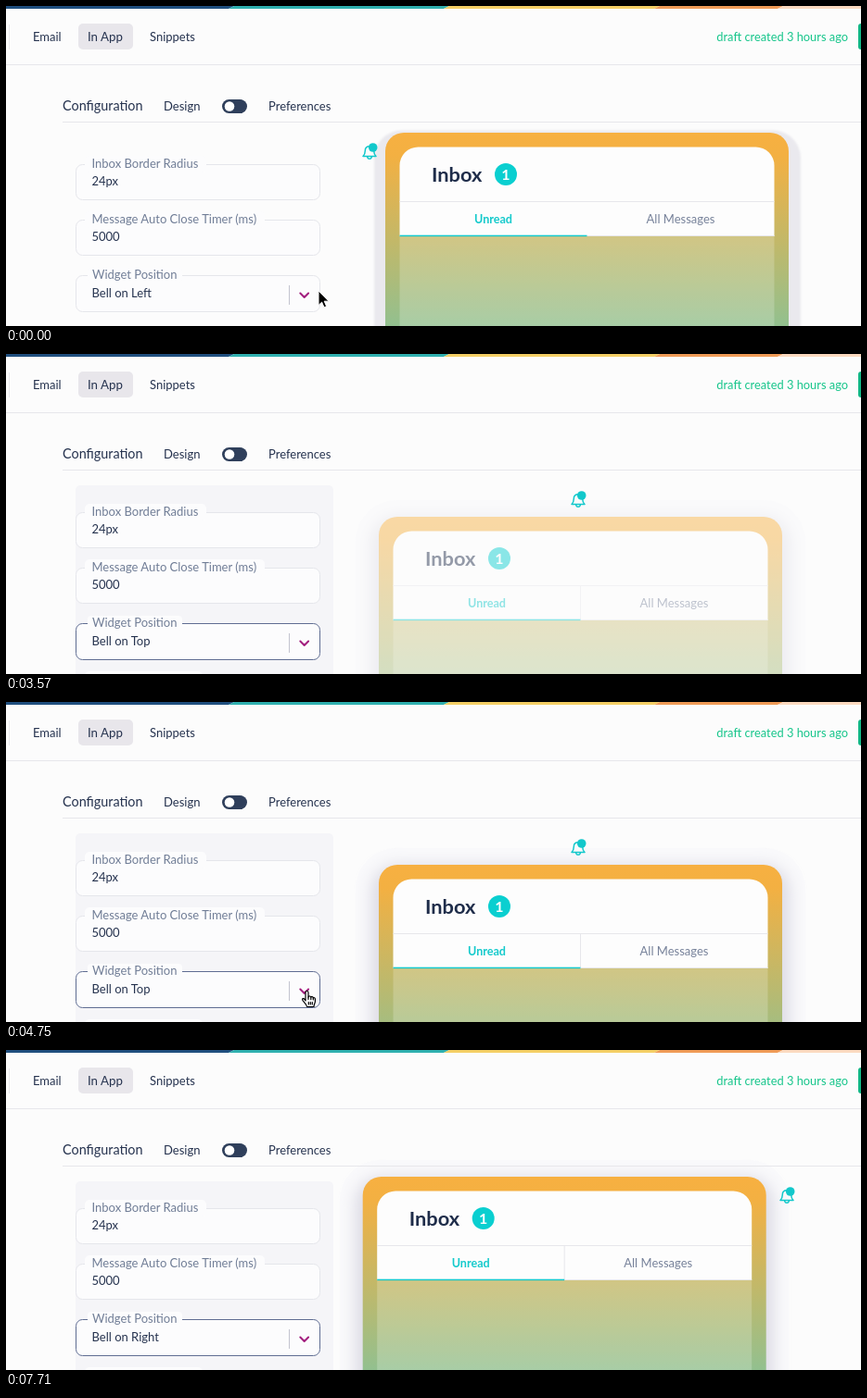
An HTML page that plays this animation: 922 px wide and 346 px high, repeating every 8 s.

```html
<!DOCTYPE html>
<html lang="en">
<head>
<meta charset="utf-8">
<title>Inbox widget configuration</title>
<style>
  html, body { margin: 0; width: 100%; height: 100%; overflow: hidden; background: #fcfcfc; }
  svg { display: block; }
  text { font: 13px Lato, "Open Sans", sans-serif; fill: #26334f; }
  .label { fill: #707d96; }
  .field { fill: #fcfcfd; stroke: #e5e6eb; }
  .patch { fill: #fcfcfd; }
  .mid { text-anchor: middle; }
  .line { stroke: #e7e7eb; }
</style>
</head>
<body>
<svg width="922" height="346" viewBox="0 0 922 346">
  <defs>
    <linearGradient id="frameFill" gradientUnits="userSpaceOnUse" x1="0" y1="0" x2="0" y2="209">
      <stop offset="0" stop-color="#f7b041"/>
      <stop offset=".12" stop-color="#f3b042"/>
      <stop offset="1" stop-color="#92c08f"/>
    </linearGradient>
    <filter id="soft" x="-20%" y="-20%" width="140%" height="140%">
      <feGaussianBlur stdDeviation="8"/>
    </filter>
    <filter id="edge"><feGaussianBlur stdDeviation=".8"/></filter>
  </defs>

  <rect width="922" height="346" fill="#fcfcfc"/>
  <rect id="panel" x="75" width="278" fill="#f5f5f8"/>

  <!-- inbox preview, origin at the frame's top left corner -->
  <g id="widget">
    <g id="band">
      <rect x="-12" y="-2.5" width="460" height="300" rx="30" fill="#eae9ee" filter="url(#edge)"/>
    </g>
    <g id="glow">
      <rect x="-25" y="-18" width="485" height="320" rx="44" fill="#f9f9fb"/>
      <rect x="-8" y="0" width="451" height="300" rx="28" fill="#dddce5" filter="url(#soft)"/>
    </g>
    <rect width="435" height="300" rx="20" fill="url(#frameFill)"/>
    <path d="M15.5 112V35.5a20 20 0 0 1 20-20H399.5a20 20 0 0 1 20 20V112Z" fill="#fdfdfd"/>
    <rect x="15.5" y="112" width="404" height="190" fill="#fff" fill-opacity=".2"/>
    <path class="line" d="M15.5 74.5H419.5M217.5 111.5H419.5"/>
    <path id="divider" class="line" d="M217.5 75V111"/>
    <rect x="15.5" y="110.7" width="202" height="1.5" fill="#13c9cd"/>
    <text x="50" y="53" style="font-size:21.8px;font-weight:700;fill:#1f2d4a">Inbox</text>
    <circle cx="130" cy="45" r="12" fill="#0acfd0"/>
    <text class="mid" x="130" y="51" style="font-size:16px;font-weight:700;fill:#fff">1</text>
    <text class="mid" x="116.5" y="97.5" style="font-size:12.6px;font-weight:700;fill:#14cacc">Unread</text>
    <text class="mid" x="318.5" y="97.5" style="fill:#77829a">All Messages</text>
  </g>

  <g id="bell" fill="none" stroke="#12c8cb" stroke-width="1.5" stroke-linecap="round" stroke-linejoin="round">
    <path d="M-7 4.5C-5 2.5-4.7 1-4.7-1.5C-4.7-4.5-2.7-6.3 0-6.3S4.7-4.5 4.7-1.5C4.7 1 5 2.5 7 4.5ZM-2.3 5.5A2.4 2.4 0 0 0 2.3 5.5"/>
    <circle cx="3.7" cy="-5" r="4.8" fill="#12c8cb" stroke="none"/>
  </g>

  <!-- page header -->
  <path fill="#204f7f" d="M0 0H246L240 3H0Z"/>
  <path fill="#2fb0af" d="M246 0H478L472 3H240Z"/>
  <path fill="#f4cf65" d="M478 0H705L699 3H472Z"/>
  <path fill="#f09b57" d="M705 0H838L832 3H699Z"/>
  <path fill="#fbdac0" d="M838 0H922V3H832Z"/>
  <path class="line" d="M0 63.5H922M61 125.5H922M3.5 20V47"/>
  <rect x="78" y="19" width="59" height="28" rx="5" fill="#e8e6eb"/>
  <text x="29" y="38">Email</text>
  <text x="88" y="38" style="font-size:13.3px">In App</text>
  <text x="155" y="38">Snippets</text>
  <text x="908" y="38" text-anchor="end" style="font-size:12.85px;fill:#15c58a">draft created 3 hours ago</text>
  <rect x="919" y="19" width="12" height="28" rx="3" fill="#12b886"/>
  <text x="61" y="113" style="font-size:14.4px">Configuration</text>
  <text x="170" y="113">Design</text>
  <rect x="233" y="101" width="27" height="15" rx="7.5" fill="#2f3f5b"/>
  <circle cx="241" cy="108.5" r="5.3" fill="#fff"/>
  <text x="283" y="113">Preferences</text>

  <!-- form -->
  <rect class="field" x="75.5" y="171.5" width="263" height="38" rx="7"/>
  <rect class="patch" x="85" y="162" width="131" height="18" rx="5"/>
  <text class="label" x="92.5" y="175">Inbox Border Radius</text>
  <text x="92.5" y="194">24px</text>
  <rect class="field" x="75.5" y="231.5" width="263" height="38" rx="7"/>
  <rect class="patch" x="85" y="222" width="194" height="18" rx="5"/>
  <text class="label" x="92.5" y="235">Message Auto Close Timer (ms)</text>
  <text x="92.5" y="254">5000</text>
  <rect id="nextLabel" class="patch" x="85" y="343" width="127" height="18" rx="5"/>
  <rect id="menu" x="75.5" y="326.5" width="263" height="40" fill="#fdfdfe" stroke="#e3e4ea"/>
  <rect id="select" class="field" x="75.5" y="291.5" width="263" height="39" rx="7"/>
  <rect class="patch" x="88" y="283" width="102" height="16" rx="4"/>
  <text class="label" x="93" y="295">Widget Position</text>
  <text id="value" x="92.5" y="315"></text>
  <path id="caret" d="M158.5 304V318" stroke="#1d2433"/>
  <path d="M305.5 302V323" stroke="#c3c5d0"/>
  <path d="M317.3 310.5L321.7 315L326.1 310.5" fill="none" stroke="#a3207f" stroke-width="2" stroke-linecap="round" stroke-linejoin="round"/>

  <!-- pointers -->
  <path id="arrow" d="M0 0V15.5L3.6 12.2L6 17.8L8.6 16.7L6.2 11.2H11Z" fill="#000" stroke="#fff" stroke-width="1"/>
  <g id="hand" stroke="#000" stroke-width="1.2" stroke-linejoin="round" stroke-linecap="round">
    <path fill="#fff" d="M4 11V2.2C4-.1 7-.1 7 2.2V7C7.3 5.6 9.6 5.7 9.8 7.3C10.2 6.2 12.2 6.5 12.3 8C12.8 7.3 14.4 7.6 14.4 9.2V11.5C14.4 14 13 14.7 13 17.5H5.6C5.3 15 2 12.6.8 10.2C.1 8.6 2 8 2.9 9.3Z"/>
    <path fill="none" d="M7 7V9.5M9.8 7.5V9.7M12.3 8.3V10M7.3 12.5V15M9.3 12.5V15M11.3 12.5V15"/>
  </g>
</svg>
<script>
  const LOOP = 8000;
  const el = Object.fromEntries([...document.querySelectorAll("[id]")].map(n => [n.id, n]));

  const layouts = [
    { from: 0, value: "Bell on Left", x: 409, y: 137, bell: 392 },
    { from: 3570, value: "Bell on Top", x: 402, y: 176, bell: 617 },
    { from: 7120, value: "Bell on Right", x: 384.7, y: 137, bell: 842 }
  ];

  // [start, shape, x, y]; the pointer holds each place until the next
  const pointer = [
    [0, "arrow", 337, 308], [140, "hand", 331, 311], [740, "hand", 328, 311],
    [890, "hand", 325, 311], [1180, "hand", 315, 311], [2230, "hand", 315, 324],
    [2670, ""], [3720, "arrow", 317, 335], [4460, "arrow", 318, 326],
    [4600, "hand", 319, 318], [4750, "hand", 319, 312], [6080, "hand", 319, 317],
    [6230, ""]
  ];

  const caretOn = [[1180, 1630], [2080, 2670], [3120, 3570], [5640, 6080], [6530, 7120]];
  const menuOpen = [[2230, 3570], [5640, 7120]];

  const within = (spans, t) => spans.some(([a, b]) => t >= a && t < b);
  const show = (node, on) => node.setAttribute("visibility", on ? "visible" : "hidden");
  const move = (node, x, y) => node.setAttribute("transform", `translate(${x} ${y})`);

  // stepped ease-out, one step about every 148 ms
  function fade(age) {
    const p = Math.min(1, 0.27 + 0.25 * Math.floor(age / 147));
    return 1 - (1 - p) ** 2;
  }

  function draw(t) {
    const layout = layouts.findLast(l => t >= l.from);
    const first = layout === layouts[0];
    const open = within(menuOpen, t);

    move(el.widget, layout.x, layout.y);
    el.widget.setAttribute("opacity", first ? 1 : fade(t - layout.from));
    show(el.band, first);
    show(el.glow, !first);
    show(el.divider, !first);
    move(el.bell, layout.bell, 158);

    el.value.textContent = layout.value;
    el.select.style.stroke = t >= 1180 ? "#5f6d92" : "";
    show(el.caret, within(caretOn, t));
    show(el.menu, open);
    show(el.nextLabel, !first && !open);

    show(el.panel, t >= 1180);
    el.panel.setAttribute("y", first ? 151 : 142);
    el.panel.setAttribute("height", first ? 180 : 220);
    el.panel.setAttribute("rx", first ? 0 : 5);

    const [, shape, x, y] = pointer.findLast(p => t >= p[0]);
    for (const name of ["arrow", "hand"]) show(el[name], name === shape);
    if (shape) move(el[shape], x, y);
  }

  const start = performance.now();
  function tick() {
    draw((performance.now() - start) % LOOP);
    requestAnimationFrame(tick);
  }
  tick();
</script>
</body>
</html>
```
